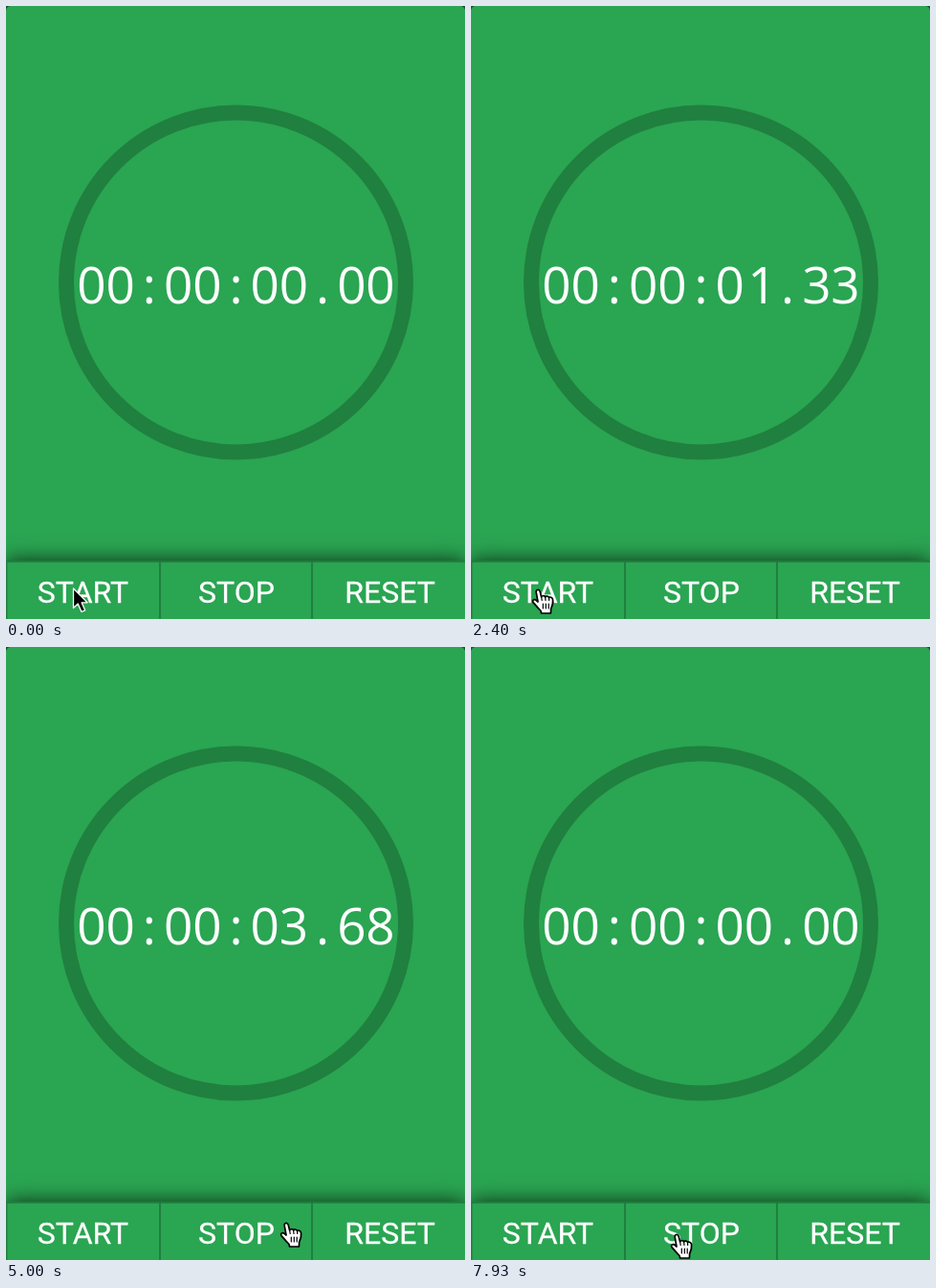
These frames come from a looping animation (480x641 px, 8000 ms). An HTML page:

```html
<!DOCTYPE html>
<html lang="en">
<head>
<meta charset="utf-8">
<title>Stopwatch</title>
<style>
  html, body { margin: 0; width: 100%; height: 100%; overflow: hidden; background: #174d2b; }
  #stage { position: relative; width: 480px; height: 641px; overflow: hidden;
           background: #2aa552; border-radius: 5px 5px 0 0; }
  #bar { position: absolute; left: 0; top: 580px; width: 480px; height: 70px;
         background: #2aa552; box-shadow: 0 0 20px rgba(0, 0, 0, .75); }
  svg { position: absolute; left: 0; top: 0; }
  text { fill: #fff; text-anchor: middle; }
  #clock text { font: 53px "Open Sans", sans-serif; }
  #labels text { font: 32px Roboto, sans-serif; stroke: #fff; stroke-width: .3px; }
</style>
</head>
<body>
<div id="stage">
  <div id="bar"></div>
  <svg width="480" height="641" viewBox="0 0 480 641">
    <circle cx="240.5" cy="289" r="177.5" fill="none" stroke="#20803f" stroke-width="16"/>
    <g id="clock"></g>
    <path d="M0 580.75H480M.5 580V641M161 580V641M320 580V641" fill="none" stroke="#1f7c3d" stroke-width="1.8"/>
    <g id="labels">
      <text x="80.5" y="624">START</text>
      <text x="241" y="624">STOP</text>
      <text x="401.5" y="624">RESET</text>
    </g>
    <path id="arrow" transform="translate(70.5 609)" d="M0 0V20.5L4.7 16L8.5 24.5L12.2 22.9L8.6 14.8H14.6Z"
          fill="#000" stroke="#fff" stroke-width="1.3" stroke-linejoin="round"/>
    <g id="hand" stroke="#000" stroke-linecap="round" stroke-linejoin="round">
      <path fill="#fff" stroke-width="1.7" d="M7 14L5.2 4.2C4.7 1 8.4.4 9.2 3.4L10.6 9C11 7.4 14 7.2 14.6 9
        C15.4 7.6 18 7.8 18.5 9.6C20 8.6 22.4 9.6 22.6 12C23 16 22.4 18 20.6 21.5L20.4 26H10.6L10 23.5
        C7 20.5 4.5 17.5 2 14.6C.6 12.6 3 11 4.8 12.2Z"/>
      <path fill="none" stroke-width="1.2" d="M10.6 9L11.2 12.5M14.6 9L15 12.5M18.5 9.6L18.7 12.5M12.3 16V21M15.3 16V21M18.2 16V21"/>
    </g>
  </svg>
</div>
<script>
const LOOP = 8000, FRAME = 200 / 3;
const START = 1070, STOP = 4732, RESET = 6660, RATE = 1.005;
const PITCH = 30.2, FIRST_X = 89.5, BASELINE = 310.5;

// Pointer path: time, x, y
const path = [
  [0, 63, 609], [2870, 63, 609], [3600, 278, 604], [3930, 278, 604], [4460, 286, 601],
  [5670, 286, 601], [6330, 432, 601], [6400, 432, 601], [6600, 440, 602],
  [7270, 440, 602], [7870, 208, 613], [LOOP, 208, 613]
];

const $ = id => document.getElementById(id);
const cells = Array.from({ length: 11 }, () => {
  const cell = document.createElementNS("http://www.w3.org/2000/svg", "text");
  cell.setAttribute("y", BASELINE);
  $("clock").append(cell);
  return cell;
});

function pointerAt(t) {
  const i = Math.max(1, path.findIndex(p => p[0] > t));
  const [t0, x0, y0] = path[i - 1], [t1, x1, y1] = path[i];
  const u = (t - t0) / (t1 - t0), e = u * u * (3 - 2 * u);
  return [x0 + (x1 - x0) * e, y0 + (y1 - y0) * e];
}

function clockText(t) {
  const elapsed = t >= RESET ? 0 : Math.max(0, Math.min(t, STOP) - START) * RATE;
  const hundredths = Math.floor(elapsed / 10 + .02);
  const pad = n => String(n).padStart(2, "0");
  return `00:00:${pad(Math.floor(hundredths / 100))}.${pad(hundredths % 100)}`;
}

function draw(now) {
  const t = Math.floor((now % LOOP + 3.4) / FRAME) * FRAME;
  [...clockText(t)].forEach((char, i) => {
    cells[i].textContent = char;
    cells[i].setAttribute("x", FIRST_X + i * PITCH + (char === "1" ? 3.5 : 0));
  });
  const isArrow = t < 130;
  $("arrow").style.display = isArrow ? "" : "none";
  $("hand").style.display = isArrow ? "none" : "";
  $("hand").setAttribute("transform", `translate(${pointerAt(Math.min(t, LOOP - 1))})`);
}

const begin = performance.now();
function tick() {
  draw(performance.now() - begin);
  requestAnimationFrame(tick);
}
tick();
</script>
</body>
</html>
```
